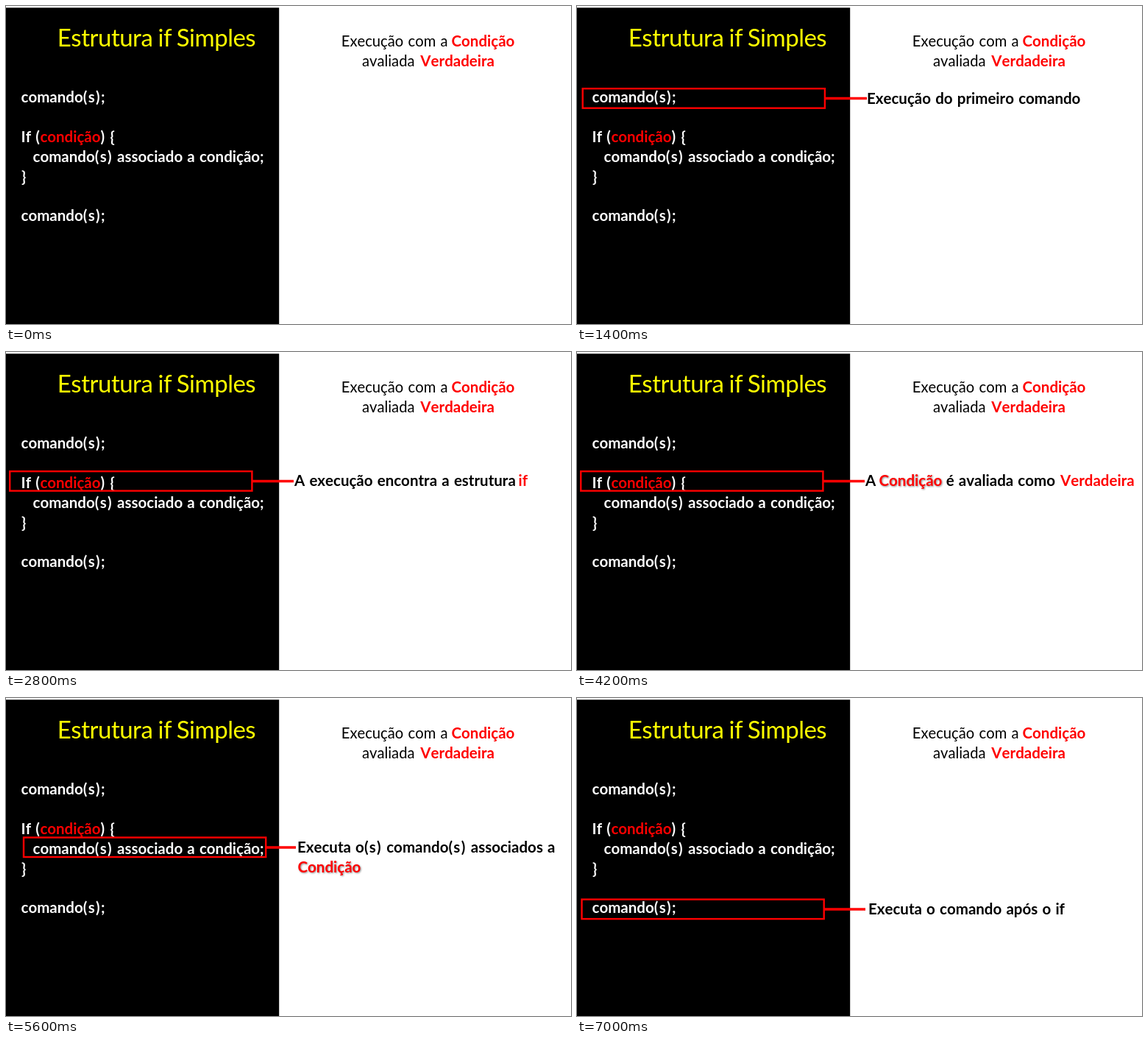
Write an HTML page that moves like this. It is 768 px wide and 432 px high and loops after 8 s.

```html
<!DOCTYPE html>
<html lang="pt">
<head>
<meta charset="utf-8">
<title>Estrutura if Simples</title>
<style>
  html, body { margin: 0; width: 100%; height: 100%; overflow: hidden; background: #fff; }
  svg { display: block; width: 768px; height: 432px; }
  text { font: 700 20.5px Lato, sans-serif; font-kerning: none; word-spacing: 1.2px; white-space: pre; }
  .code { fill: #fff; }
  .red { fill: #f00; }
  .regular { font-size: 20.2px; font-weight: 400; }
  .title { font-size: 33px; font-weight: 400; letter-spacing: -.5px; fill: #ff0; }
  .paren { letter-spacing: 1.3px; }
  .shadow { filter: drop-shadow(1.5px 1.5px 1px rgba(0, 0, 0, .45)); }
  .mark { fill: none; stroke: #f00; stroke-width: 2.4; }
  .link { stroke: #f00; stroke-width: 3.5; }
</style>
</head>
<body>
<svg id="stage" viewBox="0 0 768 432"><rect y="2.3" width="371.2" height="430"/></svg>
<script>
const STEP = 1400, LOOP = 8000;
const stage = document.getElementById('stage');

function add(parent, tag, attrs, content = '') {
  const node = document.createElementNS('http://www.w3.org/2000/svg', tag);
  for (const key in attrs) node.setAttribute(key, attrs[key]);
  node.textContent = content;
  return parent.appendChild(node);
}

// Each run is [x, baseline, text, classes]; parentheses are set a little wider.
function write(parent, runs) {
  for (const [x, y, content, style = ''] of runs) {
    const line = add(parent, 'text', { x, y, class: style });
    content.split(/(\(s\)|[()])/).forEach((part, i) =>
      add(line, 'tspan', i % 2 ? { class: 'paren' } : {}, part));
  }
}

// A highlighted code line joined to its explanation.
function scene(x, y, linkEnd, runs) {
  const group = add(stage, 'g', { visibility: 'hidden' });
  add(group, 'rect', { x, y, width: 329.2, height: 26.5, class: 'mark' });
  add(group, 'line', { x1: x + 329, x2: linkEnd, y1: y + 13.4, y2: y + 13.4, class: 'link' });
  write(group, runs);
  return group;
}

write(stage, [
  [69.8, 55, 'Estrutura', 'title'],
  [206.5, 55, 'if', 'title'],
  [231.7, 55, 'Simples', 'title'],
  [20.5, 131, 'comando(s);', 'code'],
  [20.6, 185, 'If (', 'code'],
  [46.4, 185, 'condição', 'red'],
  [128.5, 185, ') {', 'code'],
  [36.5, 211.5, 'comando(s) associado a condição;', 'code'],
  [21, 238.5, '}', 'code'],
  [20.5, 292, 'comando(s);', 'code'],
  [455.8, 55, 'Execução com a', 'regular'],
  [605.5, 55, 'Condição', 'red'],
  [484, 82, 'avaliada', 'regular'],
  [563.3, 82, 'Verdadeira', 'red']
]);

const scenes = [
  null,
  scene(7.7, 112.2, 394, [[394, 133, 'Execução do primeiro comando']]),
  scene(5.2, 162.1, 391, [
    [392, 182, 'A execução encontra a estrutura'],
    [696.5, 182, 'if', 'red']
  ]),
  scene(5.2, 162.1, 391, [
    [392, 182, 'A'],
    [410.5, 182, 'Condição', 'red shadow'],
    [501.7, 182, 'é avaliada como'],
    [657, 182, 'Verdadeira', 'red']
  ]),
  scene(24, 189.5, 394, [
    [396, 210, 'Executa o(s) comando(s) associados a'],
    [396.5, 237, 'Condição', 'red shadow']
  ]),
  scene(6.5, 273.6, 392, [[396, 294, 'Executa o comando após o if']])
];

function draw(now) {
  const current = Math.floor(now % LOOP / STEP);
  scenes.forEach((group, i) => group?.setAttribute('visibility', i === current ? 'visible' : 'hidden'));
  requestAnimationFrame(draw);
}
draw(performance.now());
</script>
</body>
</html>
```
